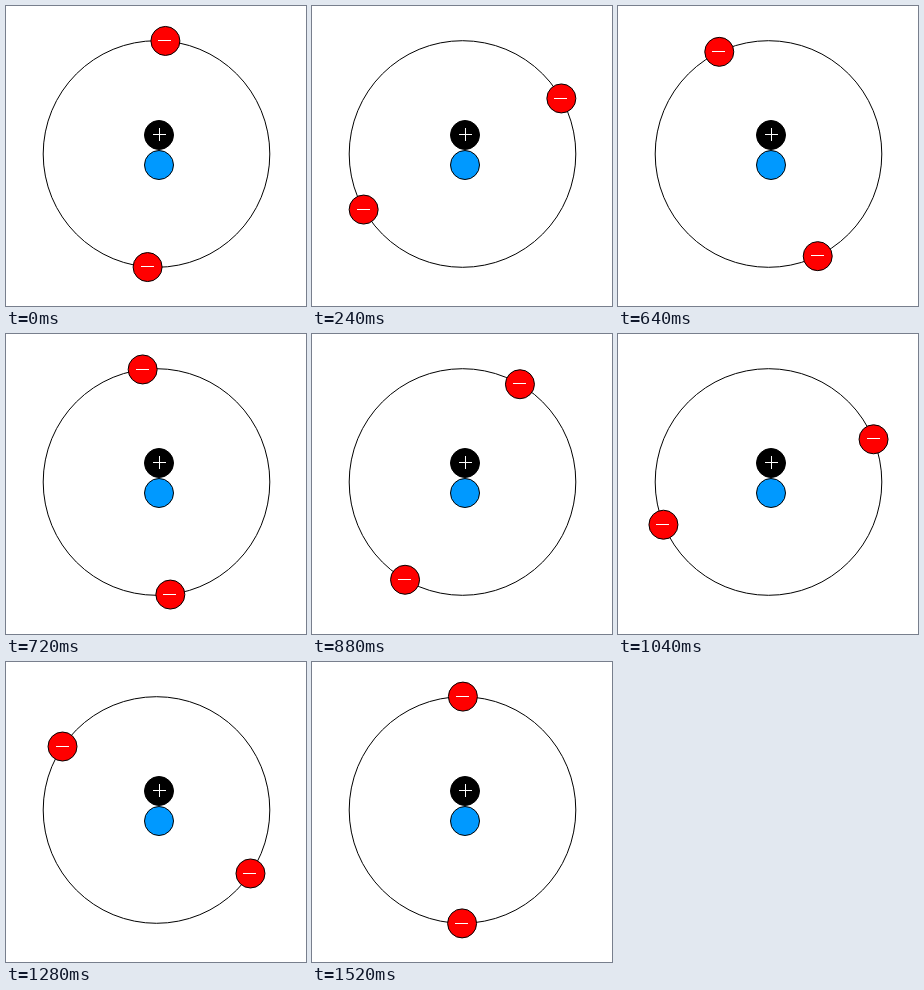
An HTML page that plays this animation: 300 by 300 pixels, repeating every 1600 ms.

```html
<!DOCTYPE html>
<html lang="en">
<head>
<meta charset="utf-8">
<title>Atom</title>
<style>
  html, body { margin: 0; width: 100%; height: 100%; overflow: hidden; background: #fff; }
  svg { display: block; width: 100%; height: 100%; }
  circle { stroke: #000; }
  path { stroke: #fff; shape-rendering: crispEdges; }
</style>
</head>
<body>
<svg viewBox="0 0 300 300">
  <circle cx="150.5" cy="148" r="113.3" fill="none"/>
  <circle cx="153" cy="159" r="14.5" fill="#09f"/>
  <circle cx="153" cy="129" r="14.5"/>
  <path d="M147 128.5h13M153.5 122v13"/>
  <g class="electron"><circle r="14.5" fill="red"/><path d="M-7 -.3h13"/></g>
  <g class="electron"><circle r="14.5" fill="red"/><path d="M-7 -.3h13"/></g>
</svg>
<script>
  const STEP_MS = 80, STEPS = 20;
  const START = 4.5, END = 360.2; // degrees clockwise from the top
  const RADIUS = 113.4;
  const electrons = document.querySelectorAll('.electron');

  function draw(now) {
    const step = Math.floor(now / STEP_MS) % STEPS;
    const angle = (START + (END - START) * step / (STEPS - 1)) * Math.PI / 180;
    electrons.forEach((electron, i) => {
      const a = angle + i * Math.PI;
      const x = 150.5 + RADIUS * Math.sin(a);
      const y = 148 - RADIUS * Math.cos(a);
      electron.setAttribute('transform', `translate(${x} ${y})`);
    });
  }

  const origin = performance.now();
  function tick() {
    draw(performance.now() - origin);
    requestAnimationFrame(tick);
  }
  tick();
</script>
</body>
</html>
```
